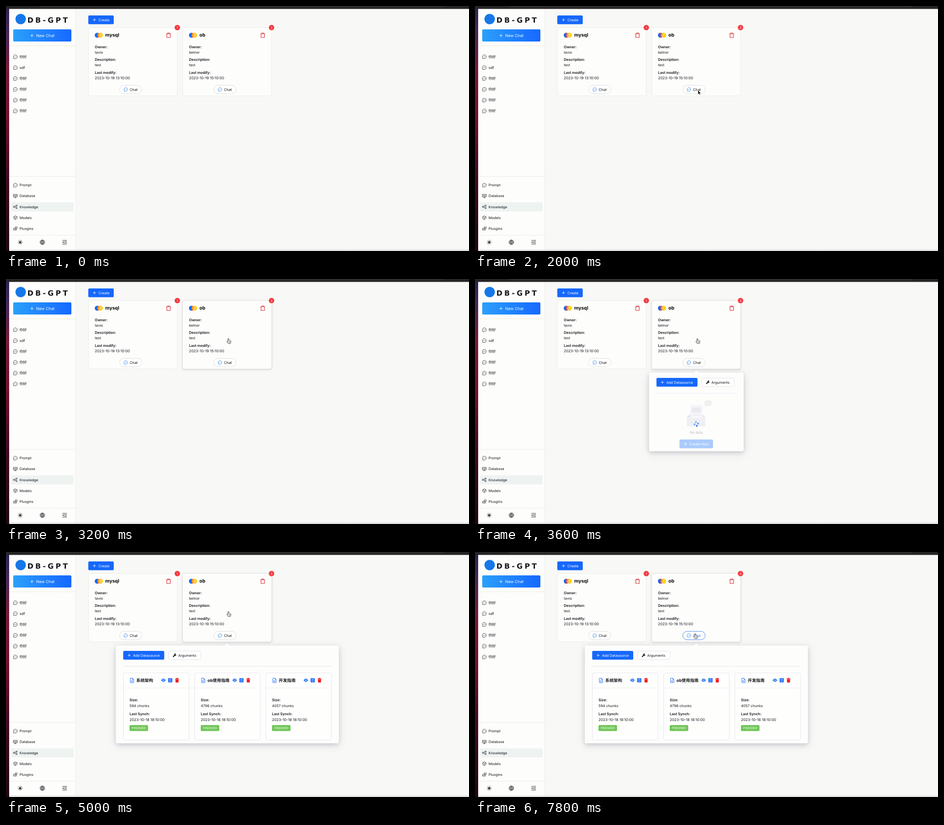
An HTML page for the animation above (8 s loop, 1027 by 545 pixels).

```html
<!DOCTYPE html>
<html lang="zh-CN">
<head>
<meta charset="utf-8">
<title>Knowledge spaces</title>
<style>
  html, body { margin: 0; width: 100%; height: 100%; overflow: hidden; background: #f8f8f6; }
  svg { display: block; width: 100%; height: 100%; }
  text { font-family: Inter, "Noto Sans CJK SC", "Noto Sans CJK", sans-serif; white-space: pre; text-rendering: geometricPrecision; }
  .wordmark { font-family: "DejaVu Sans", sans-serif; letter-spacing: 4.3px; }
  .lift { filter: drop-shadow(0 1.5px 2px rgba(30, 30, 60, .2)); }
  .float { filter: drop-shadow(0 3px 4px rgba(30, 30, 70, .13)) drop-shadow(0 4px 9px rgba(30, 30, 70, .13)); }
</style>
</head>
<body>
<svg id="stage" viewBox="0 0 1027 545" preserveAspectRatio="none" xmlns="http://www.w3.org/2000/svg"></svg>
<script>
const LOOP = 8000, STEP = 200;
const BLUE = '#1668fb', INK = '#14161b', RED = '#f01c24';

// Text placed by its left edge and the middle of its capitals.
const text = (x, y, s, size = 7.9, fill = INK, weight = 400, extra = '') =>
  `<text x="${x}" y="${y + size * .36}" font-size="${size}" fill="${fill}" font-weight="${weight}" ${extra}>${s}</text>`;
const rect = (x, y, w, h, fill, r = 0, extra = '') =>
  `<rect x="${x}" y="${y}" width="${w}" height="${h}" rx="${r}" fill="${fill}" ${extra}/>`;
const dot = (x, y, r, fill) => `<circle cx="${x}" cy="${y}" r="${r}" fill="${fill}"/>`;
const line = (d, color, w = 1, extra = '') =>
  `<path d="${d}" fill="none" stroke="${color}" stroke-width="${w}" ${extra}/>`;
const at = (x, y, body) => `<g transform="translate(${x} ${y})">${body}</g>`;
const plus = (x, y, r = 3.2) => line(`M${x - r} ${y}h${2 * r}M${x} ${y - r}v${2 * r}`, '#fff', .9);

// Icons are drawn around their own centre.
const icons = {
  bubble: c => line('M-3.800 4.200L-3.700 2.200A4.300 4.300 0 1 1-1.800 3.900z', c, .9, 'stroke-linejoin="round"') +
    dot(-2, 0, .6, c) + dot(0, 0, .6, c) + dot(2, 0, .6, c),
  screen: c => line('M-4.4-3.6h8.8v5.2h-8.8zM0 1.6v2.2M-2.5 3.8h5M-2.5-2v2M-.8-2v2M1-2v2M2.5-2v2', c, .9),
  share: c => line('M-4.2-1.4h2.8v2.8h-2.8zM1.4-3.8h2.6v2.4H1.4zM1.4 1.4h2.6v2.4H1.4zM-1.4-.5L1.4-2.4M-1.4.5L1.4 2.4', c, .9),
  cube: c => line('M0-4.2L3.6-2.2V2.1L0 4.2-3.6 2.1V-2.2zM-3.6-2.2L0-.2 3.6-2.2M0-.2V4.2', c, .9),
  blocks: c => line('M-4.2-.2h3.6v3.6h-3.6zM-.6-.2h3.2v3.6H-.6M-.2-3.6h4.2v3.4H-.2z', c, .9),
  sun: c => dot(0, 0, 2.6, c) + [0, 1, 2, 3, 4, 5, 6, 7].map(i =>
    `<path d="M0-3.5v-1.6" stroke="${c}" stroke-width="1.2" transform="rotate(${i * 45})"/>`).join(''),
  globe: c => line('M-5.2 0a5.2 5.2 0 1 0 10.4 0a5.2 5.2 0 1 0-10.4 0M-5.2 0H5.2M0-5.2V5.2M-4.4-2.7H4.4M-4.4 2.7H4.4M0-5.2c-3.6 3-3.6 7.4 0 10.4c3.6-3 3.6-7.4 0-10.4', c, .9),
  fold: c => line('M-5-4.2H5M-1-1.4H5M-1 1.4H5M-5 4.2H5', c, 1) + `<path d="M-5 0l2.8-2.2v4.4z" fill="${c}"/>`,
  bin: c => line('M-5-3.2H5M-2-3.4V-5H2v1.6M-3.8-3v8h7.6v-8', c, 1.1),
  binFull: c => `<path d="M-4.2-3.6h2.2v-1.4h4v1.4h2.2v1.5h-8.4zM-3.6-1.6h7.2L3.2 5h-6.4z" fill="${c}"/>`,
  eye: c => `<path d="M-5 0Q0-7.4 5 0Q0 7.4-5 0z" fill="${c}"/>` + dot(0, 0, 2.1, '#fff') + dot(0, 0, 1.2, c),
  sync: c => rect(-4.6, -4.6, 9.2, 9.2, c, .8) + line('M-2.2-.5v-1.5h4M2.2.5v1.5h-4M1-3l1.2 1L1-1M-1 1l-1.2 1L-1 3', '#fff', .8),
  doc: c => line('M-3.6-5H1L3.8-2.2V5h-7.4zM1-5v2.8h2.8', c, .9) + line('M-2-.2L-1 3 0 .4 1 3 2-.2', c, .7),
  wrench: c => line('M-3 3L1-1', c, 2, 'stroke-linecap="round"') + line('M2.8-2.9A1.8 1.8 0 1 0 3.3-.6', c, 1.5),
  space: () => dot(-3.6, 0, 5.6, BLUE) + '<path d="M3.5-5.6a5.6 5.6 0 0 1 0 11.2z" fill="#ffd21c"/>' +
    '<path d="M-3.6-5.6a5.6 5.6 0 0 1 0 11.2z" fill="#f5522d"/>' +
    '<path d="M3.5-5.6a5.6 5.6 0 0 0-2.5 10.6Q3.5 3 3.5-5.6zM3.5 5.6a5.6 5.6 0 0 1-3-1L3.5-5z" fill="#fbb41c"/>'
};
const icon = (name, x, y, color = '#33363c', scale = 1) =>
  `<g transform="translate(${x} ${y}) scale(${scale})">${icons[name](color)}</g>`;

function frame() {
  return rect(0, 0, 1027, 545, '#f8f8f6') + rect(0, 0, 7, 545, 'url(#wall)') +
    rect(7, 6, 147.5, 539, '#fdfdfb') + line('M154.5 6V545', '#ececea') +
    rect(0, 0, 1027, 6.5, '#252526') + rect(75, 0, 895, 3, '#303031') +
    rect(7, 540, 1020, 5, 'url(#foot)');
}

function sidebar() {
  const chats = ['你好', 'sdf', '你好', '你好', '你好', '你好'];
  const nav = [['bubble', 'Prompt'], ['screen', 'Database'], ['share', 'Knowledge'], ['cube', 'Models'], ['blocks', 'Plusgins']];
  return dot(32.5, 29, 11.5, '#1677e8') +
    text(47.5, 31.2, 'DB-GPT', 16, '#15171c', 700, 'class="wordmark"') +
    rect(16, 52, 129, 27, 'url(#newChat)', 2.5) + plus(57.5, 65.7, 3.5) + text(67, 65.8, 'New Chat', 8.8, '#fff') +
    line('M7 88.5H154', '#e9e7cd', 1, 'stroke-dasharray="3 1"') +
    chats.map((s, i) => icon('bubble', 20.7, 113 + i * 24.1) + text(30, 113 + i * 24.1, s, 8.1)).join('') +
    line('M7 379H154M7 510H154', '#e9e9e5') + rect(12, 436.5, 138, 20.5, '#eef3f2', 3) +
    nav.map(([n, s], i) => icon(n, 20.7, 398.5 + i * 24.1) + text(30, 398.5 + i * 24.1, s, 7.8)).join('') +
    icon('sun', 31.5, 525.5) + icon('globe', 80.7, 525.5) + icon('fold', 130, 525.5);
}

const chatButton = (x, color, edge) =>
  rect(x, 176.5, 49.5, 18.5, '#fefefd', 9.2, `stroke="${edge}" stroke-width=".9"`) +
  icon('bubble', x + 13.6, 185.7, '#2b82f0', .92) + text(x + 22.5, 185.8, 'Chat', 7.9, color);

function spaceCard(x, name, owner, hour, count, id) {
  const rows = [['Owner:', owner], ['Description:', 'test'], ['Last modify:', `2023-10-19 ${hour}:10:00`]];
  return rect(x, 48, 197, 152, '#fdfdfb', 4, `id="${id}" stroke="#e9e9e2" stroke-width=".9"`) +
    icon('space', x + 23, 65) + text(x + 37, 64.5, name, 10.5, '#08090c', 700) +
    icon('bin', x + 177.5, 65, '#d8232b') +
    rows.map(([k, v], i) => text(x + 14, 90.8 + i * 28.8, k, 8, INK, 600) +
      text(x + 14, 102.8 + i * 28.8, v, i === 2 ? 8.1 : 7.9)).join('') +
    chatButton(x + 69, INK, '#d9dbde') +
    dot(x + 197, 48, 6, '#f5383f') + text(x + 197, 48, count, 7, '#fff', 400, 'text-anchor="middle"');
}

const panel = (x, w, h) =>
  `<g class="float">${rect(x, 208, w, h, '#fdfdfc', 4)}<path d="M485 208.5l6-5 6 5z" fill="#fdfdfc"/></g>` +
  rect(x + 16.5, 220, 91, 19.5, BLUE, 2.5) + plus(x + 29.7, 229.8) + text(x + 38.2, 229.9, 'Add Datasource', 7.8, '#fff') +
  rect(x + 116.8, 220.3, 72, 19, '#fff', 3, 'stroke="#dedfe3" stroke-width=".9"') +
  icon('wrench', x + 130.5, 229.8, '#111') + text(x + 138.5, 229.9, 'Arguments', 7.8) +
  line(`M${x + 16.5} 254.2h${w - 33}`, '#e3e4f5', .9);

function loadingPanel() {
  return panel(386, 210, 175) +
    '<ellipse cx="517" cy="276" rx="8.5" ry="6.3" fill="#eeeeef"/><path d="M510 280l-1.5 4 5-2z" fill="#eeeeef"/>' +
    dot(513.5, 276, 1, '#fff') + dot(517, 276, 1, '#fff') + dot(520.5, 276, 1, '#fff') +
    '<path d="M470 307l8-8h25l8 8v18a3 3 0 0 1-3 3h-35a3 3 0 0 1-3-3z" fill="#e5e7ec"/>' +
    rect(477.5, 281, 27, 30, '#f7f7f9', 1.5, 'stroke="#ededf1" stroke-width=".7"') +
    rect(481, 285.5, 20, 11, '#e9eaef', 1) + line('M481 300h20M481 303.5h20', '#e6e7ec', 1.2) +
    '<path d="M470 307h10q2 0 2.5 3t3 3h10q2.5 0 3-3t2.5-3h10v18a3 3 0 0 1-3 3h-35a3 3 0 0 1-3-3z" fill="#eef0f5"/>' +
    dot(490, 318.3, 1.9, '#7fabf0') + dot(494.7, 321.6, 2, '#5b92ee') +
    dot(492, 326.7, 2.1, '#3c7df0') + dot(487, 323.3, 2, '#6fa0ee') +
    text(490.7, 340.8, 'No data', 7.8, '#b9babd', 400, 'text-anchor="middle"') +
    rect(453.5, 357, 74.5, 19.5, '#abcbfb', 2.5) + plus(466.7, 366.8) + text(475.3, 366.9, 'Create Now', 7.8, '#fff');
}

const docCard = (title, chunks, i) => at(i * 158, 0,
  rect(260.5, 269, 145.5, 149, '#fefefd', 4, 'stroke="#e4e4f0" stroke-width=".9"') +
  line('M260.5 302.5H406', '#ebebf3', .9) +
  icon('doc', 279.4, 285.7, BLUE) + text(289, 286, title, 9.3, INK, 700) +
  icon('eye', 349.2, 285.3, BLUE) + icon('sync', 364.3, 285.3, BLUE) + icon('binFull', 379.4, 285.3, RED) +
  text(274, 328.8, 'Size:', 8, INK, 600) + text(274, 342, `${chunks} chunks`) +
  text(274, 360, 'Last Synch:', 8, INK, 600) + text(274, 373.3, '2023-10-18 18:10:00', 8.1) +
  rect(274, 385, 41, 13.3, '#70c657', 2) + text(294.5, 391.8, 'FINISHED', 6.8, '#fff', 400, 'text-anchor="middle"'));

const stage = document.getElementById('stage');
const stops = list => list.map(([o, c, a = 1]) => `<stop offset="${o}" stop-color="${c}" stop-opacity="${a}"/>`).join('');
const group = (id, body) => `<g id="${id}">${body}</g>`;
stage.innerHTML = `<defs>
  <linearGradient id="wall" x2="0" y2="1">${stops([[0, '#2b2350'], [.1, '#45285a'], [.25, '#761b3c'], [.45, '#74112e'], [.68, '#450b22'], [1, '#1f0711']])}</linearGradient>
  <linearGradient id="newChat">${stops([[0, '#2ba0fb'], [1, '#1668ff']])}</linearGradient>
  <linearGradient id="foot" x2="0" y2="1">${stops([[0, '#d8d8d8', 0], [1, '#d8d8d8']])}</linearGradient>
  </defs>` + frame() + sidebar() +
  rect(182.5, 21, 56.5, 19.5, BLUE, 2.5) + plus(196.2, 30.7) + text(205, 30.8, 'Create', 7.8, '#fff') +
  spaceCard(183, 'mysql', 'tavio', 13, 1, 'firstCard') +
  spaceCard(392, 'ob', 'belnor', 15, 3, 'hoverCard') +
  group('activeChat', chatButton(461, '#3f8cf5', '#3f86f0')) +
  group('loading', loadingPanel()) +
  group('loaded', panel(243.5, 495, 217.5) + group('docs',
    [['系统架构', 594], ['ob使用指南', 4796], ['开发指南', 4057]].map(([s, n], i) => docCard(s, n, i)).join(''))) +
  group('cursor',
    group('arrow', '<path d="M0 0v9l2.1-1.9 1.5 3.3 1.7-.8-1.5-3.1h2.8z" fill="#111" stroke="#fff" stroke-width=".6"/>') +
    group('hand', '<path d="M-1.8 1.6V-4.6a1 1 0 0 1 2 0V-1.6Q1.8-2.3 2-1.2Q3.5-1.7 3.6-.5Q4.9-.7 4.9.6Q5 3.5 3.5 5.6H-1.2Q-2.3 3.7-4.2 1.3Q-4-.7-1.8 1.6zM.8 1.2v2.2M2.3 1.2v2.2" fill="#fff" stroke="#25262a" stroke-width=".9" stroke-linejoin="round"/>'));

const el = id => document.getElementById(id);
const show = (id, on) => el(id).setAttribute('display', on ? 'inline' : 'none');

// Pointer path: time, x, y.
const path = [[1000, 1004, 531], [1400, 566, 260], [1800, 494.5, 187.5], [2400, 494.5, 187.5],
  [2600, 494, 138], [6400, 494, 138], [6800, 489, 187]];

function pointer(t) {
  const next = path.findIndex(p => p[0] > t);
  if (next < 0) return path[path.length - 1].slice(1);
  if (next === 0) return path[0].slice(1);
  const [t0, x0, y0] = path[next - 1], [t1, x1, y1] = path[next];
  const k = (t - t0) / (t1 - t0);
  return [x0 + (x1 - x0) * k, y0 + (y1 - y0) * k];
}

function draw(time) {
  const t = Math.floor(time % LOOP / STEP) * STEP;
  const [x, y] = pointer(t);
  show('cursor', t >= 1000);
  show('arrow', t < 2600);
  show('hand', t >= 2600);
  el('cursor').setAttribute('transform', `translate(${x} ${y})`);
  el('hoverCard').setAttribute('class', t >= 2600 ? 'lift' : '');
  show('loading', t === 3600);
  show('loaded', t >= 3800);
  el('docs').setAttribute('opacity', t < 4000 ? .68 : 1);
  show('activeChat', t >= 6800);
}

const start = performance.now();
function tick() {
  draw(performance.now() - start);
  requestAnimationFrame(tick);
}
tick();
</script>
</body>
</html>
```
